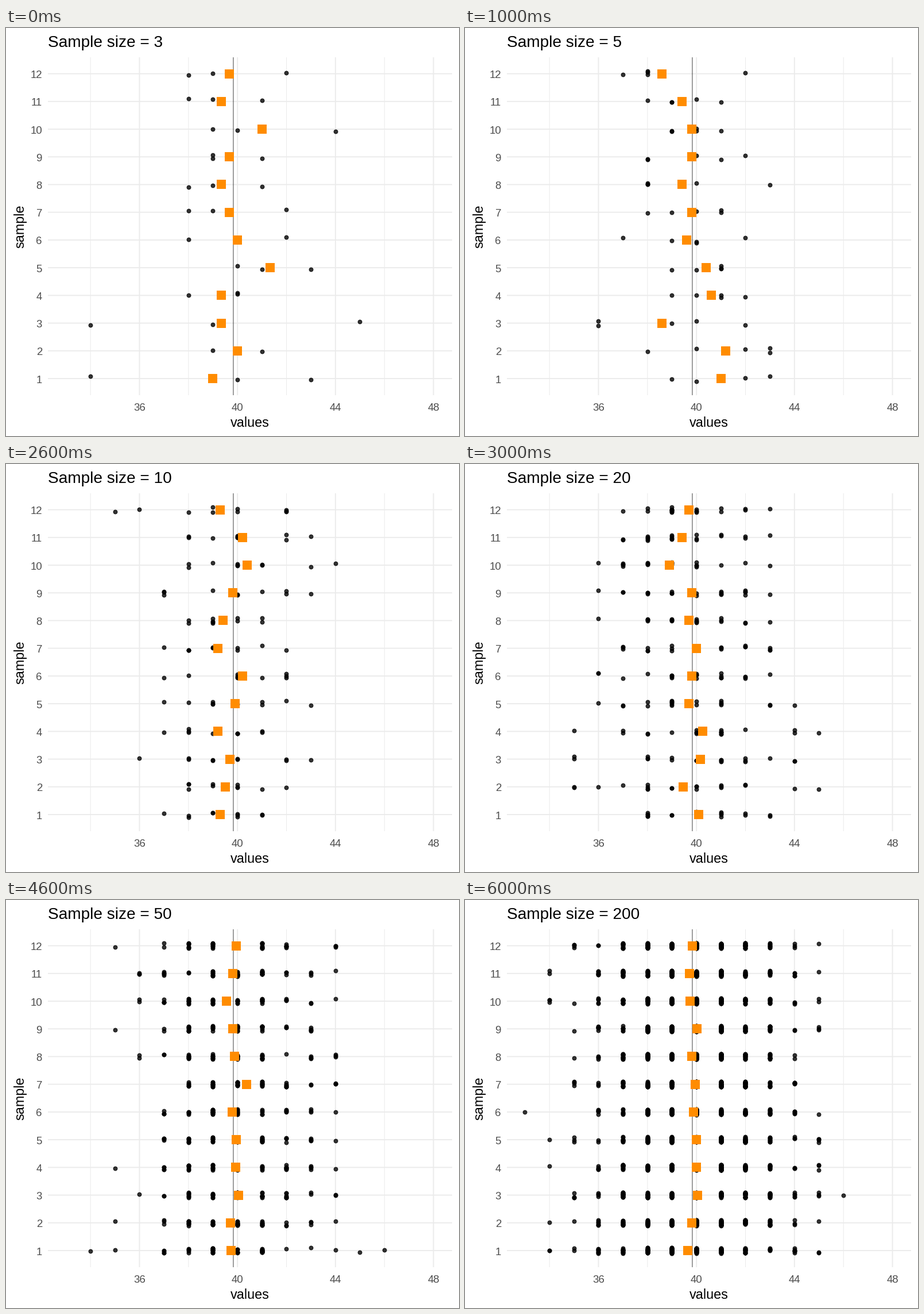
Write a matplotlib script that moves like this. It is 789 by 710 pixels and loops after 7 s.

```python
import numpy as np
import matplotlib.pyplot as plt
from matplotlib.animation import FuncAnimation

W, H, DPI = 789, 710, 100
PX = 72 / DPI                                   # points per pixel
LEFT, RIGHT, TOP, BOTTOM = 73, 777, 51, 639     # plot panel
CENTRE, SPREAD, JITTER = 39.83, 1.9, 0.1
SAMPLES = np.arange(1, 13)
GRID, TICK, ORANGE = "#EBEBEB", "#4D4D4D", "#FF8C00"
plt.rcParams["font.family"] = ["Liberation Sans", "DejaVu Sans"]

# Sample size -> for samples 1 to 12, how far the sum lies from size * 40.
SUM_OFFSETS = {
    3: [-3, 0, -2, -2, 4, 0, -1, -2, -1, 3, -2, -1],
    5: [5, 6, -7, 3, 2, -2, -1, -3, -1, -1, -3, -7],
    10: [-7, -5, -3, -8, -1, 2, -8, -6, -2, 4, 2, -7],
    20: [2, -11, 3, 5, -6, -4, 0, -6, -4, -22, -12, -6],
    50: [-13, -14, 2, -4, -2, -11, 19, -6, -9, -23, -10, -3],
    100: [-21, 11, -35, -19, 7, -11, -22, -23, -34, -29, -8, 5],
    200: [-70, -36, 10, -2, 0, -24, -10, -40, 6, -50, -56, -34],
}


def to_x(value):
    return 232.5 + (np.asarray(value) - 36) * 128 / 3


def to_y(sample):
    return 610 - (np.asarray(sample) - 1) * 48.22


def draw_sample(rng, size, total):
    """Whole numbers around total / size, nudged until they add up to total."""
    values = np.rint(rng.normal(total / size, SPREAD, size)).clip(33, 47)
    while (gap := total - values.sum()) != 0:
        values[rng.integers(size)] += np.sign(gap)
    return values


def make_scene(size, offsets):
    rng = np.random.default_rng(size)
    totals = 40 * size + np.array(offsets)
    values = np.concatenate([draw_sample(rng, size, t) for t in totals])
    heights = np.repeat(SAMPLES, size) + rng.uniform(-JITTER, JITTER, values.size)
    return (
        f"Sample size = {size}",
        np.column_stack([to_x(values), to_y(heights)]),
        np.column_stack([to_x(totals / size), to_y(SAMPLES)]),
    )


scenes = [make_scene(*item) for item in SUM_OFFSETS.items()]

fig = plt.figure(figsize=(W / DPI, H / DPI), dpi=DPI, facecolor="white")
ax = fig.add_axes([0, 0, 1, 1])
ax.set(xlim=(0, W), ylim=(H, 0))
ax.axis("off")


def label(x, y, text, size, **style):
    return ax.text(x, y, text, fontsize=size * PX, va="baseline", **style)


def v_lines(values, color, width, zorder=1):
    ax.vlines(to_x(values), TOP, BOTTOM, color=color, lw=width * PX,
              zorder=zorder, snap=False)


# grid and overall mean
major = range(36, 49, 4)
v_lines(range(34, 47, 4), GRID, 1)
v_lines(major, GRID, 1.9)
ax.hlines(to_y(SAMPLES), LEFT, RIGHT, color=GRID, lw=1.9 * PX, zorder=1,
          snap=False)
v_lines(CENTRE, (0, 0, 0, 0.45), 1.7, zorder=2)

# axis labels
for sample in SAMPLES:
    label(63, to_y(sample) + 7.5, str(sample), 18.67, ha="right", color=TICK)
for value in major:
    label(to_x(value), 666, str(value), 18.67, ha="center", color=TICK)
label(424.5, 694, "values", 23.33, ha="center")
label(31, 345, "sample", 23.33, ha="center", rotation=90,
      rotation_mode="anchor")

title = label(73, 33, "", 28)
dots = ax.scatter([], [], s=(6.7 * PX) ** 2, facecolor=(0, 0, 0, 0.8),
                  edgecolor=(0, 0, 0, 0.8), linewidth=1.2 * PX, zorder=3)
squares = ax.scatter([], [], s=(16 * PX) ** 2, marker="s", color=ORANGE,
                     linewidth=0, zorder=4)


def update(i):
    text, points, means = scenes[i]
    title.set_text(text)
    dots.set_offsets(points)
    squares.set_offsets(means)
    return title, dots, squares


anim = FuncAnimation(fig, update, frames=len(scenes), interval=1000,
                     repeat=True, repeat_delay=0)
plt.show()
```
